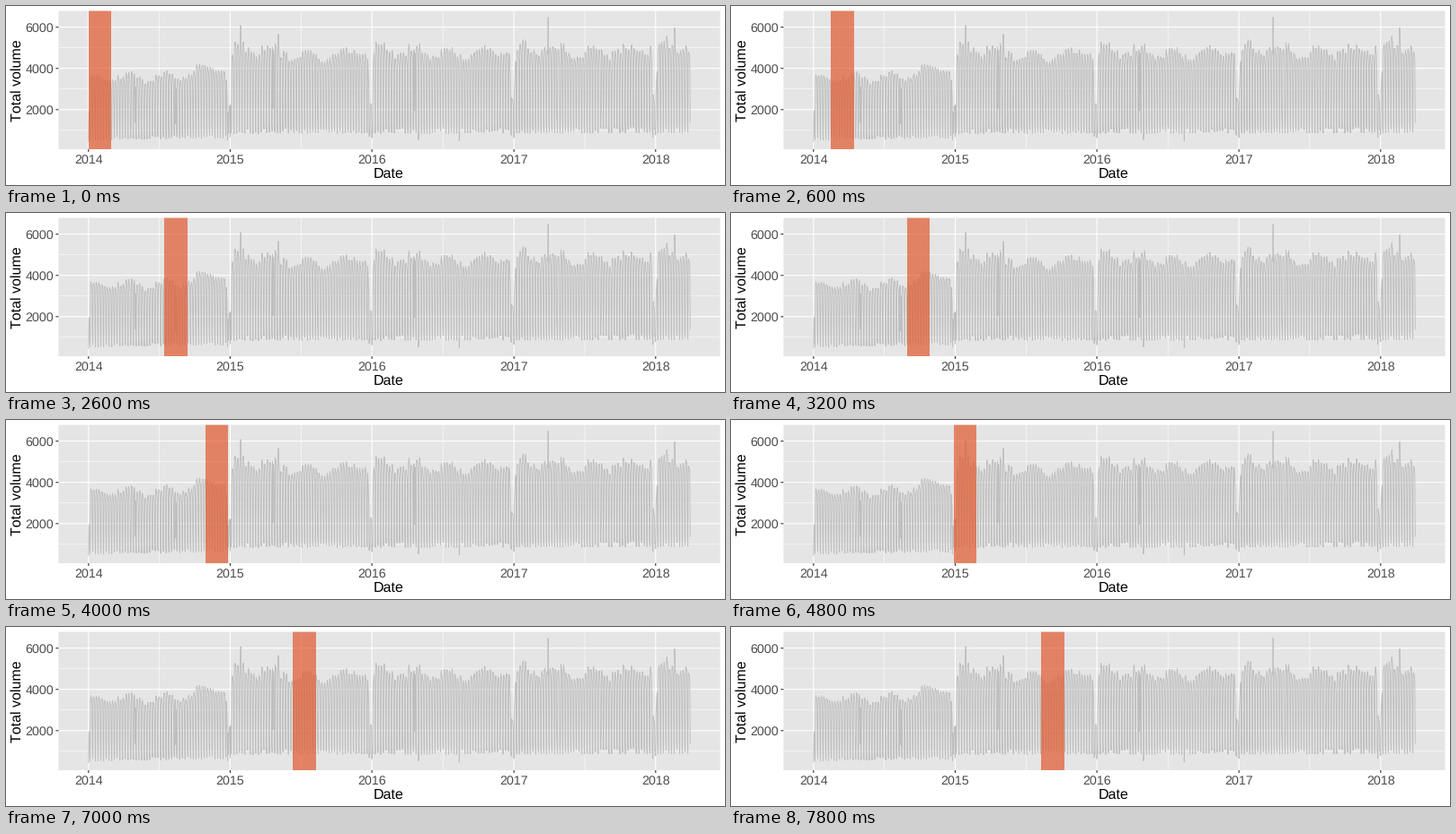
A matplotlib script for the animation above (8000 ms loop, 800 px wide and 200 px high).

```python
import numpy as np
import matplotlib.pyplot as plt
from matplotlib.animation import FuncAnimation
from matplotlib.patches import Rectangle

W, H, DPI = 800, 200, 100
PX = 72 / DPI  # points per pixel
FRAMES, INTERVAL = 40, 200
LEFT, RIGHT, TOP, BOTTOM = 58.4, 794.5, 5.5, 160
X0, DAY = 91.8, 0.4319
YEAR_STARTS = np.array([0, 365, 730, 1096, 1461])
LAST_DAY = 1550

plt.rcParams.update({
    "font.family": "Liberation Sans",
    "path.simplify": False,
    "text.hinting": "none",
    "text.kerning_factor": 6,
})


def date_x(day):
    return X0 + DAY * day


def vol_y(volume):
    return 161.9 - 0.02305 * volume


def daily_volume():
    rng = np.random.default_rng(14)
    days = np.arange(LAST_DAY + 1)
    t = days / 365.25
    weekday = (days + 2) % 7  # 0 is Monday
    week = (days + 2) // 7
    noise = rng.random((3, days.size))

    # Slow growth, a step after the first year, seasons and weekly jitter
    level = np.interp(t, [0, 0.5, 0.9, 1, 1.04, 1.6, 4.25],
                      [3450, 3700, 4150, 4150, 5000, 4750, 5050])
    level *= 1 + 0.05 * np.cos(8 * np.pi * (t - 0.05))
    level *= 1 + 0.03 * np.cos(2 * np.pi * (t - 0.1))
    level *= 1.05 - 0.08 * noise[0][week]

    # Slump around each new year
    from_new_year = days[:, None] - YEAR_STARTS
    slump = np.exp(-((from_new_year + 3) / 6.5) ** 4).max(axis=1)
    level *= 1 - 0.5 * slump

    shape = np.array([0.98, 1, 0.98, 0.95, 0.87, 0.27, 0])[weekday]
    vol = level * shape * (1 - 0.05 * noise[1])

    floor = np.interp(t, [0, 0.95, 1.03, 4.2], [560, 680, 900, 950])
    floor *= 0.92 + 0.28 * noise[2] ** 2
    vol = np.where(weekday == 6, floor, np.maximum(vol, 1.15 * floor))

    # Yearly holidays, closed days and a few busy days
    for start in YEAR_STARTS[:-1]:
        vol[start + np.array([110, 120, 225])] *= 0.4
    closed = np.isin(from_new_year, (0, -7)).any(axis=1)
    vol[closed] = 0.75 * floor[closed]
    for day, peak in ((392, 6080), (489, 5650), (1184, 6480), (1510, 5970)):
        vol[day] = peak
    return date_x(days), vol_y(vol)


fig = plt.figure(figsize=(W / DPI, H / DPI), dpi=DPI, facecolor="white")
ax = fig.add_axes([0, 0, 1, 1])
ax.set_xlim(0, W)
ax.set_ylim(H, 0)
ax.axis("off")


def line(xs, ys, color, width, z):
    ax.plot(xs, ys, color=color, lw=width * PX, zorder=z, snap=False,
            solid_capstyle="butt", solid_joinstyle="round")


def label(x, y, text, size, color, **kw):
    ax.text(x, y, text, fontsize=size * PX, color=color,
            ha="center", va="baseline", **kw)


ax.add_patch(Rectangle((LEFT, TOP), RIGHT - LEFT, BOTTOM - TOP, lw=0,
                       color="#E5E5E5", snap=False, zorder=0))

for v in (1000, 3000, 5000):
    line([LEFT, RIGHT], [vol_y(v)] * 2, "white", 0.55, 1)
for a, b in zip(YEAR_STARTS, YEAR_STARTS[1:]):
    line([date_x((a + b) / 2)] * 2, [TOP, BOTTOM], "white", 0.55, 1)

for v in (2000, 4000, 6000):
    y = vol_y(v)
    line([LEFT, RIGHT], [y, y], "white", 1.1, 2)
    line([LEFT - 3, LEFT], [y, y], "#333333", 1.1, 2)
    label(37.3, y + 5, str(v), 14.3, "#4D4D4D")
for i, day in enumerate(YEAR_STARTS):
    x = date_x(day)
    line([x, x], [TOP, BOTTOM], "white", 1.1, 2)
    line([x, x], [BOTTOM, BOTTOM + 3], "#333333", 1.1, 2)
    label(x, 176, str(2014 + i), 14.3, "#4D4D4D")

label(426, 192, "Date", 16, "black")
label(17, 83, "Total volume", 16, "black", rotation=90,
      rotation_mode="anchor")

line(*daily_volume(), "#BEBEBE", 0.9, 3)

band = Rectangle((92, TOP), 25, BOTTOM - TOP, lw=0, facecolor="#E1592D",
                 alpha=0.7, snap=False, zorder=4)
ax.add_patch(band)


def update(i):
    # The window slides in equal steps and lands on whole pixels
    left = round(91.6 + 6.5 * i)
    right = round(117.4 + 6.5 * i)
    band.set_x(left)
    band.set_width(right - left)
    return (band,)


anim = FuncAnimation(fig, update, frames=FRAMES, interval=INTERVAL,
                     init_func=lambda: update(0), repeat=True, repeat_delay=0)
plt.show()
```
